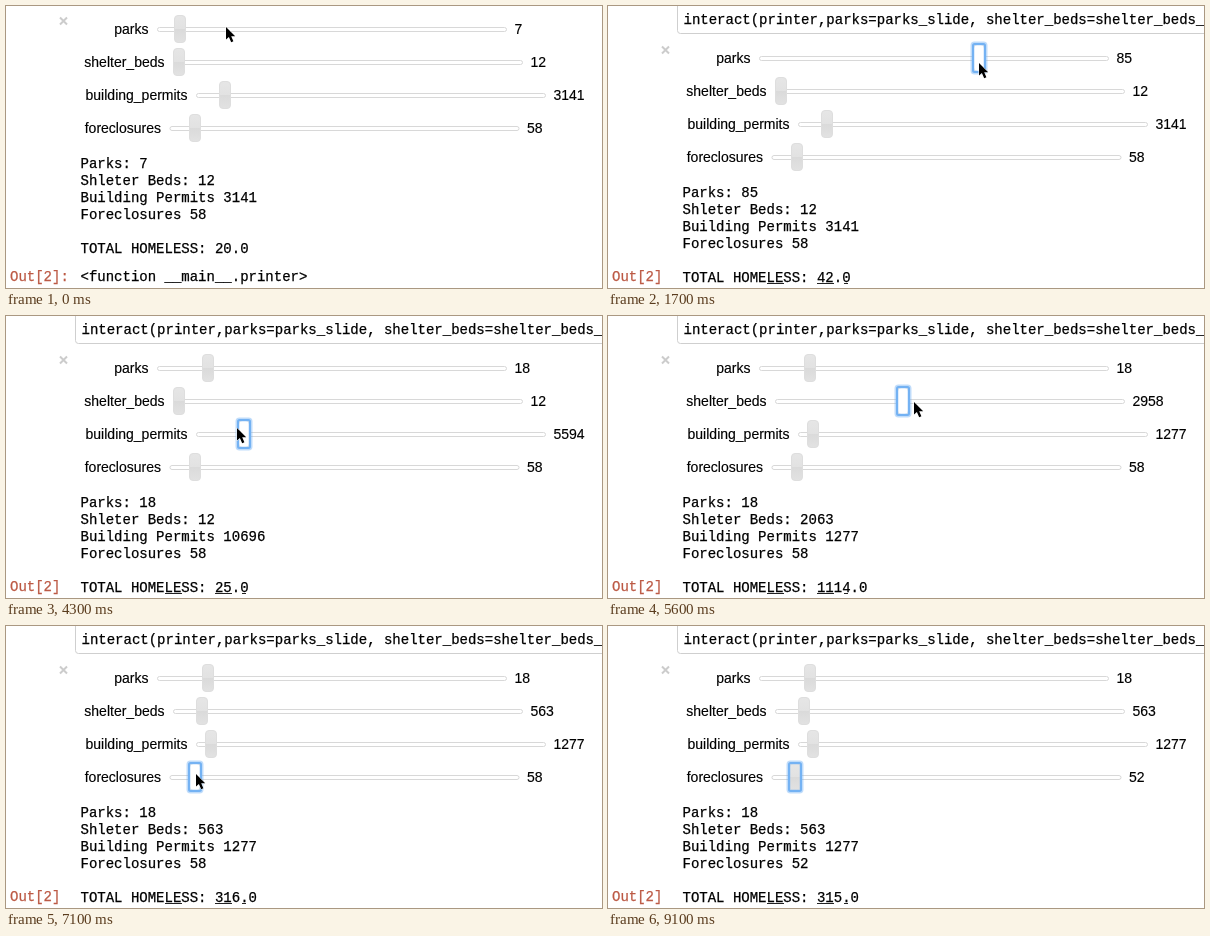
Animation, 596 px wide and 282 px high, one loop 9900 ms. Source, as an HTML page:

```html
<!DOCTYPE html>
<html lang="en">
<head>
<meta charset="utf-8">
<title>Interactive sliders</title>
<style>
  html, body { margin: 0; width: 100%; height: 100%; overflow: hidden; background: #fff; }
  svg { display: block; width: 596px; height: 282px; }
  text { white-space: pre; fill: #000; stroke: #000; stroke-width: .15px; }
  .label { font: 14px Helvetica, Arial, "Liberation Sans", sans-serif; }
  .mono { font: 14px "Courier New", "Liberation Mono", monospace; stroke-width: .25px; }
  .prompt { fill: #bc5a45; stroke: #bc5a45; }
</style>
</head>
<body>
<svg id="stage" viewBox="0 0 596 282">
  <defs>
    <linearGradient id="grip" x1="0" y1="0" x2="0" y2="1">
      <stop offset="0" stop-color="#e6e6e6"/>
      <stop offset=".5" stop-color="#e2e2e2"/>
      <stop offset=".5" stop-color="#dadada"/>
      <stop offset="1" stop-color="#e2e2e2"/>
    </linearGradient>
  </defs>
</svg>
<script>
const LOOP = 9900, STEP = 100, PRINT_LAG = 200;
const SCROLL_AT = 500, SCROLL_BY = 29, CURSOR_GONE = 9000;
const stage = document.getElementById('stage');

function add(parent, tag, attrs = {}, content = '') {
  const node = document.createElementNS('http://www.w3.org/2000/svg', tag);
  for (const key in attrs) node.setAttribute(key, attrs[key]);
  node.textContent = content;
  parent.appendChild(node);
  return node;
}
const mono = (parent, x, y, content = '') => add(parent, 'text', { class: 'mono', x, y }, content);
const show = (node, on) => node.setAttribute('visibility', on ? 'visible' : 'hidden');
const move = (node, x, y) => node.setAttribute('transform', `translate(${x} ${y})`);
const mix = (a, b, u) => a + (b - a) * u;

// drag: [time, value] points, eased; hold: where the pointer sits relative to the handle.
const sliders = [
  { name: 'parks', print: 'Parks: ', left: 151, scale: 2.526, weight: .282,
    hold: [0, 5], grab: 500, release: 2600, drag: [[500, 7], [1500, 85], [1700, 85], [2500, 18]] },
  { name: 'shelter_beds', print: 'Shleter Beds: ', left: 167, scale: .0414, weight: .532,
    hold: [11, 1], grab: 5000, release: 6600, drag: [[5100, 12], [5400, 2063], [5600, 2958], [6500, 563]] },
  { name: 'building_permits', print: 'Building Permits ', left: 190, scale: .00764, weight: .00026,
    hold: [-7, -6], grab: 3300, release: 4700, drag: [[3400, 3141], [4100, 10696], [4300, 5594], [4600, 1277]] },
  { name: 'foreclosures', print: 'Foreclosures ', left: 163.5, scale: .345, weight: .17,
    hold: [1, -3], grab: 6900, release: 8800, drag: [[7100, 58], [7600, 180], [8700, 52]] }
];
const visits = [...sliders].sort((a, b) => a.grab - b.grab);

function valueAt({ drag }, t) {
  const next = drag.findIndex(point => point[0] > t);
  if (next === 0) return drag[0][1];
  if (next < 0) return drag[drag.length - 1][1];
  const [t0, v0] = drag[next - 1], [t1, v1] = drag[next];
  return Math.round(mix(v0, v1, (1 - Math.cos(Math.PI * (t - t0) / (t1 - t0))) / 2));
}
const handleX = (s, t) => Math.round(s.left + 5.5 + s.scale * valueAt(s, t));
const holdPoint = (s, t) => [handleX(s, t) + s.hold[0], s.y + SCROLL_BY + s.hold[1]];

// The pointer follows the held handle; between handles it changes row first, then slides across.
function pointerAt(t) {
  let from = [220, 21], leave = 200;
  for (const s of visits) {
    if (t < s.grab) {
      const u = Math.max(0, (t - leave) / (s.grab - leave));
      const to = holdPoint(s, t);
      return [mix(from[0], to[0], u ** 2), mix(from[1], to[1], 1 - (1 - u) ** 4)];
    }
    from = holdPoint(s, t);
    leave = s.release;
    if (t < leave) break;
  }
  return from;
}

const page = add(stage, 'g');
add(page, 'rect', { x: 69.5, y: -40, width: 560, height: 38.5, rx: 3, fill: '#fff', stroke: '#cfcfcf' });
mono(page, 75.5, -11, 'interact(printer,parks=parks_slide, shelter_beds=shelter_beds_');
add(page, 'path', { d: 'M54 11.5l7 7m0-7l-7 7', stroke: '#ccc', 'stroke-width': 2 });

sliders.forEach((s, i) => {
  const y = s.y = 23 + 33 * i;
  add(page, 'text', { class: 'label', x: s.left - 8.5, y: y + 5, 'text-anchor': 'end' }, s.name);
  s.readout = add(page, 'text', { class: 'label', x: s.left + 357.5, y: y + 5 });
  add(page, 'rect', { x: s.left + .5, y: y - 1.5, width: 349, height: 4, rx: 2, fill: '#fff', stroke: '#d8d8d8' });
  s.handle = add(page, 'g');
  s.body = add(s.handle, 'rect', { x: -5.5, y: y - 13.5, width: 11, height: 27, rx: 3.5, stroke: '#dedede' });
  s.ring = add(s.handle, 'g', { fill: 'none', stroke: '#74b2f3' });
  add(s.ring, 'rect', { x: -6.5, y: y - 14.5, width: 13, height: 29, rx: 2, 'stroke-width': 4, opacity: .45 });
  add(s.ring, 'rect', { x: -6, y: y - 14, width: 12, height: 28, rx: 1.5, 'stroke-width': 2 });
  s.line = mono(page, 74.5, 162 + 17 * i);
});
const totalLine = mono(page, 74.5, 247);

add(stage, 'text', { class: 'mono prompt', x: 4, y: 275 }, 'Out[2]');
const result = add(stage, 'g');
add(result, 'text', { class: 'mono prompt', x: 54.4, y: 275 }, ':');
mono(result, 74.5, 275, '<function __main__.printer>');
// Remnants of the result line that stay below the total.
const remnants = add(stage, 'path', { d: 'M159 277.5h17m33 0h17m10 0h4', stroke: '#222' });

const cursor = add(stage, 'path', {
  d: 'M0 0V12.6L2.9 10L5.2 15.2L7.4 14.2L5.2 9.2H9.2Z',
  fill: '#000', stroke: '#fff', 'stroke-width': 1, 'paint-order': 'stroke'
});

function draw(time) {
  const t = Math.floor((time % LOOP) / STEP) * STEP;
  const scrolled = t >= SCROLL_AT;
  const focused = visits.filter(s => t >= s.grab).pop();
  let total = .9;

  move(page, 0, scrolled ? SCROLL_BY : 0);
  show(result, !scrolled);
  show(remnants, scrolled);

  for (const s of sliders) {
    const printed = valueAt(s, t - PRINT_LAG);
    const held = s === focused && t < s.release;
    total += s.weight * printed;
    move(s.handle, handleX(s, t), 0);
    s.body.setAttribute('fill', held ? '#fff' : 'url(#grip)');
    show(s.ring, s === focused);
    s.readout.textContent = valueAt(s, t);
    s.line.textContent = s.print + printed;
  }
  totalLine.textContent = `TOTAL HOMELESS: ${Math.round(total)}.0`;

  move(cursor, ...pointerAt(t));
  show(cursor, t < CURSOR_GONE);
}

const start = performance.now();
function tick() {
  draw(performance.now() - start);
  requestAnimationFrame(tick);
}
tick();
</script>
</body>
</html>
```
